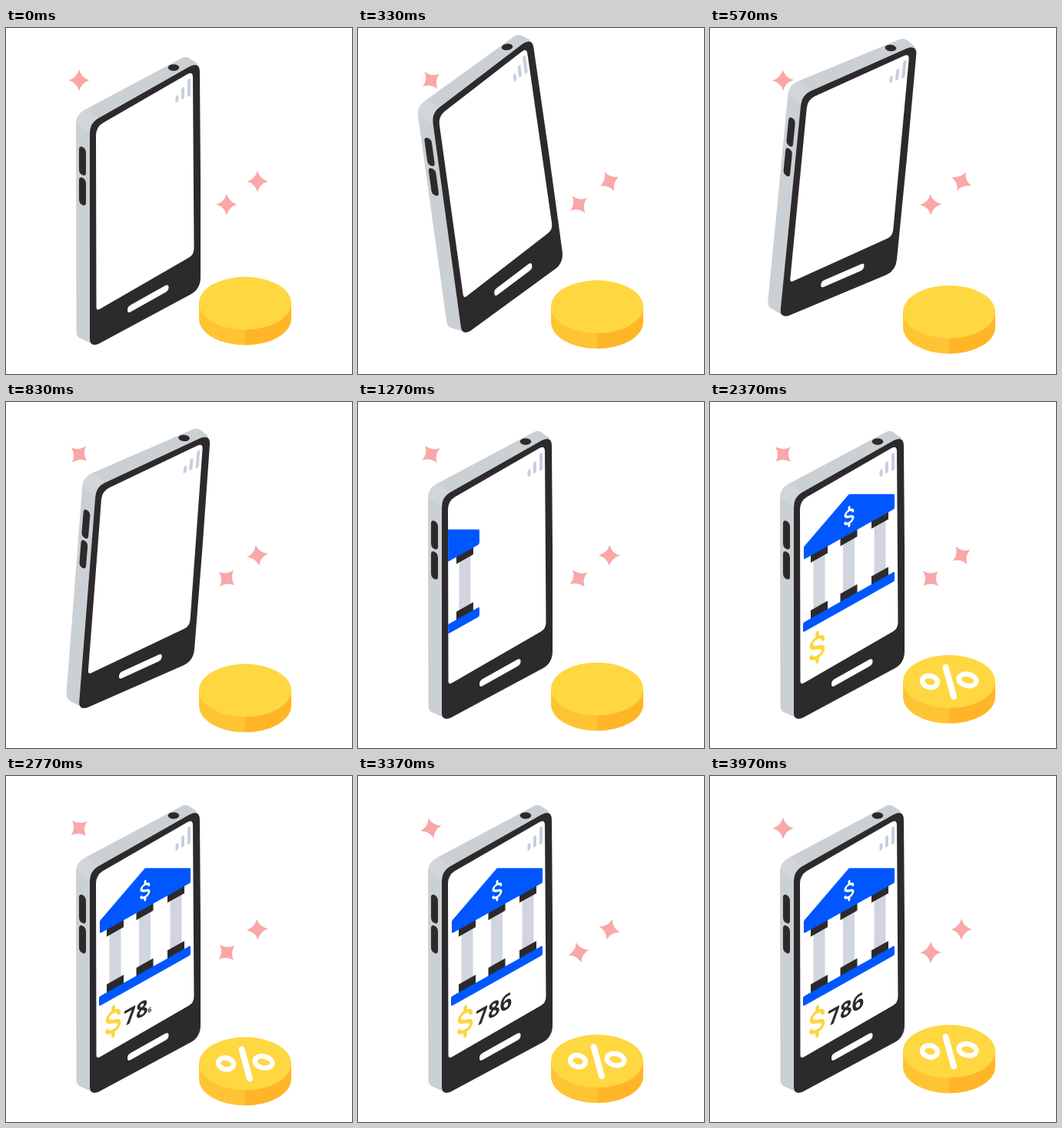
Animation of 450x450 px, one loop 4000 ms. Source, as an HTML page:

```html
<!DOCTYPE html>
<html lang="en">
<head>
<meta charset="utf-8">
<title>Mobile banking</title>
<style>
  html, body { margin: 0; width: 100%; height: 100%; overflow: hidden; background: #fff; }
  svg { display: block; width: 100%; height: 100%; }
  .ink { fill: #2d2a2c; }
  .blue { fill: #0057ff; stroke: #0057ff; stroke-width: 4; stroke-linejoin: round; }
  .line { fill: none; stroke-linecap: round; stroke-linejoin: round; }
  .digits { font: 700 27.5px "Open Sans", "Noto Sans", sans-serif; }
</style>
</head>
<body>
<svg viewBox="0 0 450 450">
  <defs>
    <path id="screen" d="M117 140Q117 129 126 123.500L236 60Q243 56 243 64L244.500 286Q244.500 295 238 298.500L122 365.500Q117.500 368 117.500 363Z"/>
    <clipPath id="clip"><use href="#screen"/></clipPath>
    <path id="star" fill="#f9a7a8" d="M0-14Q3-3 13.500 0Q3 3 0 14Q-3 3-13.500 0Q-3-3 0-14Z"/>
    <path id="dollar" class="line" stroke-width="4" d="M7-6C6-13-7-13-7-6C-7 1 7-1 7 6C7 13-6 13-7.500 7M0-12V-17M0 12V17"/>
  </defs>

  <use href="#star" class="star"/>
  <use href="#star" class="star"/>
  <use href="#star" class="star"/>

  <g id="phone">
    <path fill="#cbd0d5" d="M91 125Q91 112 104 105.500L228 39.500Q233 36.500 238 39L249 46.500L130 200L115 412L96 403.500Q91.500 401 91.500 395Z"/>
    <path fill="#d2d6db" d="M91 125Q92 112 104 105.500L121 118Q109 125 109 136Z"/>
    <path class="ink" d="M109 137Q109 124 119 118L239 50Q252 44 252 57L253 191V324Q253 339 241 346L120 411Q109 415 109 404Z"/>
    <use href="#screen" fill="#fff"/>
    <ellipse class="ink" cx="218" cy="51.500" rx="7.300" ry="4.200"/>
    <path class="ink" d="M95 158q0-5 4-3.500q5 2 5 7.500v26q0 5-4 3.500q-5-2-5-7.500zm0 40q0-5 4-3.500q5 2 5 7.500v25q0 5-4 3.500q-5-2-5-7.500z"/>
    <rect x="158" y="383" width="53.500" height="9" rx="4" fill="#fff" transform="matrix(1 -.56 0 1 0 68)"/>
    <g clip-path="url(#clip)">
      <!-- sheared plane of the screen; y is true at x = 121 -->
      <g transform="matrix(1 -.56 0 1 0 67.8)">
        <g fill="#c8cede">
          <rect x="220.500" y="144.500" width="4" height="9" rx="1.800"/>
          <rect x="228" y="138.500" width="4" height="15" rx="1.800"/>
          <rect x="236" y="131.500" width="4" height="23" rx="1.800"/>
        </g>
        <g id="bank">
          <g id="columns"></g>
          <path class="blue" d="M124 190L181 155.500L238 187.500V203.500H124Z"/>
          <rect class="blue" x="123" y="289" width="115" height="8.500"/>
          <use href="#dollar" stroke="#fff" transform="translate(181 182.600) scale(.72)"/>
        </g>
        <use href="#dollar" id="price" stroke="#ffd53d"/>
        <g id="digits" class="ink digits"></g>
      </g>
    </g>
  </g>

  <g id="coin">
    <path fill="#ffc433" d="M251 358V378A60 34.500 0 0 0 311 412.500V358Z"/>
    <path fill="#ffb526" d="M371 358V378A60 34.500 0 0 1 311 412.500V358Z"/>
    <ellipse cx="311" cy="358" rx="60" ry="34.500" fill="#ffd740"/>
    <g id="percent" class="line" stroke="#fff" stroke-width="6.500">
      <ellipse cx="-25" cy="0" rx="10" ry="7.500" transform="rotate(12 -25 0)"/>
      <ellipse cx="24" cy="-2" rx="11.500" ry="7.500" transform="rotate(12 24 -2)"/>
      <path stroke-width="8" d="M-4.500-18.500L6 19.500"/>
    </g>
  </g>
</svg>
<script>
const $ = id => document.getElementById(id);
const put = (el, transform) => el.setAttribute('transform', transform);
const ease = u => (1 - Math.cos(Math.PI * Math.min(1, Math.max(0, u)))) / 2;
const ramp = (t, from, to) => ease((t - from) / (to - from));
const wave = (t, period) => (1 - Math.cos(2 * Math.PI * t / period)) / 2;

$('columns').innerHTML = [131, 169.5, 210].map(x => `
  <rect x="${x + 3.5}" y="210" width="15" height="72" fill="#d0d6dc"/>
  <path class="ink" d="M${x} 203h22v11.500h-22zm0 73.500h22v12h-22z"/>`).join('');
$('digits').innerHTML = [...'786'].map(c => `<text>${c}</text>`).join('');

const digits = [...$('digits').children];
const stars = [...document.querySelectorAll('.star')];
const places = [[95, 68], [287, 229.5], [327, 199.5]];
const turns = [-150, -150, -107];

function draw(t) {
  // the phone hops while tilting left, then right
  const hop = t < 1000 ? -31.5 * wave(t, 1000) : 0;
  const tilt = -7.8 * ramp(t, 0, 333) + 16.6 * ramp(t, 333, 667) - 8.8 * ramp(t, 667, 1000);
  put($('phone'), `translate(0 ${hop}) rotate(${tilt} 181 226)`);

  put($('bank'), `translate(${-125 * (1 - ramp(t, 1000, 1680))} 0)`);
  put($('percent'), `translate(311 358) scale(${ramp(t, 1700, 2050)})`);
  put($('price'), `translate(139.5 329.5) scale(${1.1 * ramp(t, 2030, 2340)})`);
  digits.forEach((d, i) => {
    const start = 2380 + 160 * i;
    put(d, `translate(${153.2 + 15.7 * i} 344) scale(${ramp(t, start, start + 190)})`);
  });

  const swing = wave(t, 2000);
  put($('coin'), `translate(0 ${18.3 * swing})`);
  stars.forEach((s, i) => put(s, `translate(${places[i]}) rotate(${turns[i] * swing})`));
}

const begin = performance.now();
function frame() {
  draw((performance.now() - begin) % 4000);
  requestAnimationFrame(frame);
}
frame();
</script>
</body>
</html>
```
